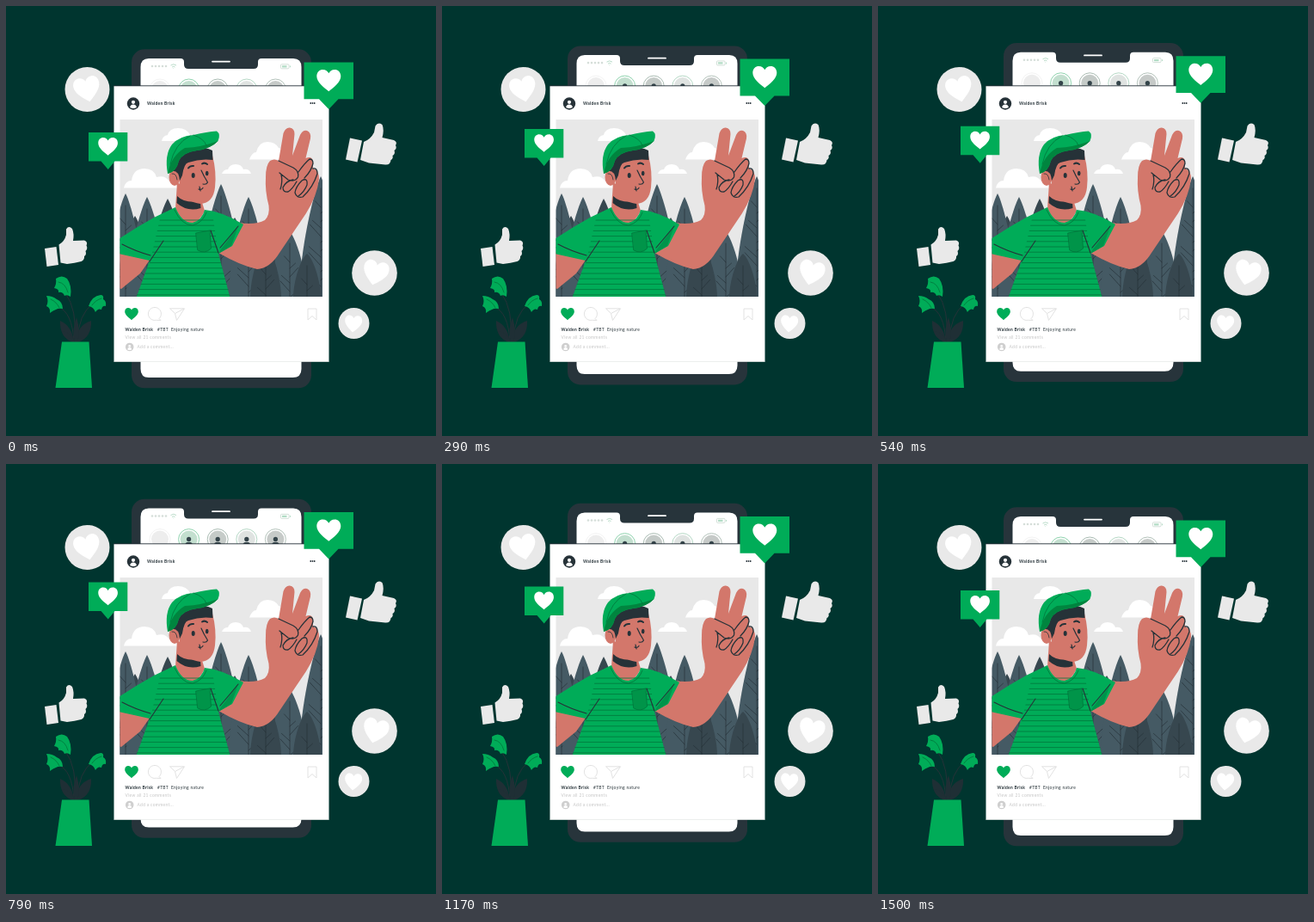
An HTML page that plays this animation: 500 px wide and 500 px high, repeating every 1.54 s.

```html
<!DOCTYPE html>
<html lang="en">
<head>
<meta charset="utf-8">
<title>Social post</title>
<style>
html, body { margin: 0; width: 100%; height: 100%; overflow: hidden; background: #00352f; }
svg { display: block; width: 100vw; height: 100vh; }
text { font-family: Lato, sans-serif; font-size: 4.9px; letter-spacing: .32px; fill: #263238; }
.b { font-weight: 700; }
.ln { fill: none; stroke: #263238; stroke-linecap: round; stroke-linejoin: round; }
.seam { fill: none; stroke: #00753c; stroke-width: .8; stroke-linecap: round; }
.icon { fill: none; stroke: #e2e2e2; stroke-width: 1; stroke-linejoin: round; }
</style>
</head>
<body>
<svg viewBox="0 0 500 500">
<defs>
  <path id="heart" d="M0 7C-3 4.6-8 1-8-3C-8-6-6-7.5-4-7.5C-2-7.5-.6-6.4 0-5C.6-6.4 2-7.5 4-7.5C6-7.5 8-6 8-3C8 1 3 4.6 0 7Z"/>
  <g id="user"><circle cy="-1.7" r="2.1"/><path d="M-3.8 4.4Q-3.6 .9 0 .9T3.8 4.4Q0 6.4-3.8 4.4Z"/></g>
  <clipPath id="photo"><rect x="132.500" y="132" width="235.500" height="206"/></clipPath>
  <clipPath id="torso"><path d="M180 243L240 241L247 288L261 338H151L168 295Z"/></clipPath>
</defs>
<rect width="500" height="500" fill="#00352f"/>

<!-- likes -->
<g fill="#e9e9e9">
  <circle cx="94.500" cy="97" r="26"/><circle cx="428.500" cy="310.500" r="26.300"/><circle cx="404.500" cy="369" r="18"/>
  <path d="M400 153.500L414 156.500L408.500 181.500L395 178.500Z"/>
  <path d="M416 158Q424 155 428 147L429.500 139.500Q432.500 134.500 437.500 138Q440 144 437.500 153L451 156Q455.500 158 453 162Q455 165.500 451.500 168Q453 172 449.500 174Q450.500 177.500 447.500 179Q447 185 441 184.500L422 182.500L412 179Z"/>
  <path d="M45 282L58.500 280L61 301L47.500 303Z"/>
  <path d="M61.500 277.500Q68 274 70 266L70 259.500Q73 255 77 259Q79.500 265 78 273L91 272.500Q95.500 274 93.500 278.500Q95.500 282 92.500 285Q94 289 91 291Q91.500 295 87.500 297Q80 299 71 300L63.500 298.500Z"/>
</g>
<g fill="#fff">
  <use href="#heart" transform="translate(94.500 97.500) rotate(-12) scale(1.9 2)"/>
  <use href="#heart" transform="translate(429.500 311) rotate(14) scale(1.85 1.95)"/>
  <use href="#heart" transform="translate(403.800 370) rotate(5) scale(1.25 1.35)"/>
</g>

<!-- plant -->
<g>
  <path class="ln" stroke-width="1" d="M80 390Q83 352 69 334M79 390Q77 356 61 350M83 390Q84 358 101 346"/>
  <g fill="#1f2f35">
    <path d="M79 391Q62 386 63 366Q77 372 79 391Z"/><path d="M77 391Q66 386 65 378Q76 379 80 391Z"/>
    <path d="M82 391Q82 371 99 366Q100 385 84 391Z"/><path d="M80 391Q76 376 82 362Q87 378 83 391Z"/>
  </g>
  <g fill="#00ac58">
    <path d="M58 317Q65 312 71 317Q77 325 75 338Q71 335 68 337Q66 332 61 333Q62 329 56 328Q59 323 58 317Z"/>
    <path d="M47 337Q54 337 59 341Q66 344 66 352Q61 351 58 353Q55 354 51 357Q52 351 47 349Q50 343 47 337Z"/>
    <path d="M96 349Q100 337 110 336Q114 336 113 341Q117 343 116 349Q112 348 111 353Q107 351 104 356Q102 350 96 349Z"/>
    <path d="M65 390.500H96.500L100 444H57.500Z"/>
  </g>
  <path class="seam" d="M61 321Q69 322 72 333M52 341Q59 344 62 351M111 340Q104 342 100 348"/>
</g>

<!-- phone -->
<g class="float">
  <rect x="146" y="50.300" width="209" height="394" rx="15" fill="#27343b"/>
  <path fill="#fff" d="M166 61H203Q207 61 207 65V68Q207 73 212 73H288Q293 73 293 68V65Q293 61 297 61H334Q343.500 61 343.500 71V422Q343.500 432 333.500 432H166Q156.500 432 156.500 422V71Q156.500 61 166 61Z"/>
  <path d="M240 64.600H260" stroke="#fff" stroke-width="1.800" stroke-linecap="round"/>
  <g id="dots" fill="#d5ded9"></g>
  <path d="M191.500 69Q194.800 66.500 198 69M193 71Q194.800 69.500 196.500 71M194.500 72.500H195" fill="none" stroke="#b9dcc9" stroke-width="1"/>
  <rect x="319.500" y="67.800" width="9.500" height="5" rx="1" fill="none" stroke="#c8d8cf" stroke-width=".8"/>
  <path d="M321 69.200H326.500V71.400H321ZM330 69.500H331V71.300H330Z" fill="#b2dcc5"/>
  <g id="stories"></g>
</g>

<!-- post -->
<rect x="125.500" y="93" width="250" height="320.500" fill="#fff"/>
<path d="M125 92.800H375.500" stroke="#263238" stroke-width=".9"/>
<path d="M125.500 413.500H375.500" stroke="#e4e8e6" stroke-width=".7"/>
<circle cx="148" cy="113.500" r="7.200" fill="#263238"/>
<use href="#user" x="148" y="113.500" fill="#fff"/>
<text class="b" x="164" y="115.200">Walden Brisk</text>
<g fill="#263238"><circle cx="354.300" cy="113" r=".9"/><circle cx="356.500" cy="113" r=".9"/><circle cx="358.700" cy="113" r=".9"/></g>

<g clip-path="url(#photo)">
  <rect x="132" y="132" width="237" height="207" fill="#e8e8e8"/>
  <g fill="#fff">
    <path d="M181 157Q182 151 188 150Q190 142 200 142Q210 142 214 150L216 157Z"/>
    <path d="M137 211.500Q139 203 146 203Q148 189 161 189Q172 189 175 199Q185 196 190 204Q198 205 199 211.500Z"/>
    <path d="M251 195Q253 190 258 190Q260 184 267 184Q274 184 276 190Q283 189 285 195Z"/>
    <path d="M283 178.500Q286 170 291 170Q294 158 304 158Q313 158 317 165Q327 167 331 178.500Z"/>
  </g>
  <g id="trees"></g>

  <!-- left arm, neck -->
  <path fill="#d3776b" d="M131 286L168 294L156 311L134 329L131 328Z"/>
  <path fill="#d3776b" d="M199 205L197 236Q203 253 214 254Q225 252 231 238L226 222Z"/>
  <path fill="#263238" d="M199 221Q208 230 226 227L226.500 235Q211 240 198.500 229Z"/>

  <!-- right arm and hand -->
  <path fill="#d3776b" d="M271 252Q290 255 301 249Q307 243 305.500 232Q301 215 302 199Q302 185 307 180Q312 177 317 180L322.500 148Q325 141 330 141.500Q335.500 142 335.500 149L333 174L342 150Q345 144 350 145Q355 147 354 154L348.500 177Q356 174 357 181L357 189Q364 191 364 201Q362 220 349 241L318 287Q307 305 292 306Q273 302 247 287Z"/>
  <path class="ln" stroke-width="1.300" d="M317 180L334 188Q341 192 339.500 199Q336 205 328 202L318 194M320 196Q322 204 319 213M334 202Q326 203 322 211Q322 217 328 216Q333 213 338 204M340 193Q347 183 353 178Q357 178 357 183Q355 192 347 200M357 189Q362 188 362 195Q357 211 345 222Q338 224 336 217Q337 210 344 203Q351 199 350 208Q347 216 340 221"/>

  <!-- shirt -->
  <path fill="#00ac58" d="M197 234Q204 252 217 252Q228 249 231 237Q252 239 276 254L263 279L247 288L260.500 339H151.500L167 296L131 288V271Q152 257 172 246Z"/>
  <g id="stripes" clip-path="url(#torso)"></g>
  <path fill="#009449" d="M221 264L237 261L238.500 282Q231 289 223 284Z"/>
  <path class="seam" d="M221 264L237 261L238.500 282Q231 289 223 284ZM196 237Q204 255 217 255Q229 252 233 240"/>
  <path fill="#00944b" d="M236 257L247 287L270 256L262 279L247 288Z"/>
  <path class="ln" stroke-width="1.100" d="M183 273L167 297M135 277Q150 285 168 290M238 261L247 287M270 256Q261 267 249 281"/>

  <!-- head -->
  <path fill="#d3776b" d="M201 178L240 174Q245 192 243 211Q241 229 226 230Q210 228 202 214Z"/>
  <ellipse cx="196" cy="199" rx="6.500" ry="10" fill="#d3776b"/>
  <path class="ln" stroke-width=".8" d="M193 195Q198 194 199 202"/>
  <path fill="#263238" d="M192 189L202 168Q224 160 240 168L240.500 179Q226 177 212 182Q207 183 205 197L202 203Q201 190 192 192Z"/>
  <g fill="#263238"><ellipse cx="217.700" cy="197" rx="2" ry="3"/><ellipse cx="233.700" cy="194.500" rx="1.800" ry="2.800"/></g>
  <path class="ln" stroke-width="2" d="M212 188.500Q214 185.500 218 186M228 183.500Q231 181.500 234 184"/>
  <path class="ln" stroke-width="1.200" d="M227 191Q230 198 234.500 205Q233 208 229 207M224 213Q227 214.500 229 211.500M225 210L226 215"/>
  <path fill="#00ac58" d="M188 195Q184 173 193 161Q202 151 218 150Q234 146 245 145.500Q250 149 246.500 157Q238 166 222 168Q206 170 201 180Q198 193 188 195Z"/>
  <path fill="#00853f" d="M246.500 157Q238 166 222 168Q206 170 201 180Q198 193 188 195Q192 174 208 165Q228 164 246.500 157Z"/>
  <path class="seam" d="M218 150Q230 154 233 162M214 151Q196 160 191 184"/>
</g>

<use href="#heart" transform="translate(146 358.300) scale(.98)" fill="#00ac58"/>
<path class="icon" d="M178 363.500A7.500 7.500 0 1 0 174.500 365.300L180 365.500ZM190.500 351.800H207.500L198.500 365.500L196.500 357.500ZM196.500 357.500L207 352M351 352H361V365L356 360.500L351 365Z"/>
<text class="b" x="138.500" y="378">Walden Brisk</text>
<text x="176" y="378">#TBT</text>
<text x="192" y="378">Enjoying nature</text>
<text x="138.500" y="386.700" style="fill:#c4c4c4">View all 21 comments</text>
<circle cx="143.700" cy="396.500" r="4.800" fill="#cfcfcf"/>
<use href="#user" transform="translate(143.700 396.500) scale(.66)" fill="#fff"/>
<text x="152.500" y="398.200" style="fill:#c4c4c4">Add a comment...</text>

<!-- badges -->
<g class="float">
  <path fill="#00ac58" d="M346.500 65.500H404V108.300H386.500L375.300 120L364 108.300H346.500Z"/>
  <use href="#heart" transform="translate(375.300 87) scale(1.75)" fill="#fff"/>
  <path fill="#00ac58" d="M96 147H141.300V180.500H126.500L118.700 190L110.500 180.500H96Z"/>
  <use href="#heart" transform="translate(118.600 163.700) scale(1.42)" fill="#fff"/>
</g>
</svg>
<script>
const $ = id => document.getElementById(id);
const fill = (id, list, draw) => { $(id).innerHTML = list.map(draw).join(''); };

function tree([x, top, w, color = '#455a64']) {
  const h = 340 - top;
  let twigs = `M${x} ${top + 14}V340`;
  for (let y = top + 36, i = 0; y < 336; y += 17, i++) {
    const s = Math.min(w * .55, (y - top) * .18), side = i % 2 ? 1 : -1;
    twigs += `M${x} ${y}l${side * s} ${-s * 1.1}M${x} ${y + 7}l${-side * s} ${-s * .9}`;
  }
  return `<path fill="${color}" d="M${x} ${top}C${x + 7} ${top + h * .1} ${x + w} ${top + h * .6} ${x + w} 340H${x - w}C${x - w} ${top + h * .6} ${x - 7} ${top + h * .1} ${x} ${top}Z"/>
    <path class="ln" stroke-width=".7" d="${twigs}"/>`;
}

const dark = '#37474f';
fill('trees', [
  [150, 244, 22, dark], [188, 224, 26, dark], [139, 218, 22], [164, 222, 24],
  [266, 246, 24, dark], [250, 207, 26], [312, 230, 24], [282, 222, 23],
  [366, 198, 25], [330, 262, 20], [302, 276, 18, dark], [350, 288, 16, dark]
], tree);
fill('stripes', [...Array(15).keys()], i => `<path class="seam" d="M150 ${249 + i * 6.2}H262"/>`);
fill('dots', [...Array(5).keys()], i => `<circle cx="${170 + i * 4}" cy="70" r="1.3"/>`);
fill('stories', [
  ['#ededed', '#f3f3f3', 0], ['#c3dfcf', '#8fd3ae', 1], ['#c5cbc8', '#a9bbb2', 1],
  ['#dfe3e1', '#b5d8c5', 1], ['#c6cac8', '#b3c2ba', 1]
], ([inner, ring, on], i) => `<g transform="translate(${179 + i * 33.6} 97)">
  <circle r="12" fill="#fff" stroke="${ring}"/><circle r="10" fill="${inner}"/>
  ${on ? '<use href="#user" fill="#34444a" transform="translate(0 2) scale(1.25)"/>' : ''}</g>`);

// Linear float, 10 px up and back in 1.5 s, stepped at 24 fps
const LOOP = 1540, RISE = 10, STEP = 1000 / 24;
const floats = document.querySelectorAll('.float');

function render(ms) {
  const t = Math.floor((ms % LOOP + 5) / STEP) * STEP;
  const up = Math.max(0, 1 - Math.abs(t / 750 - 1)) * RISE;
  floats.forEach(g => g.setAttribute('transform', `translate(0 ${-up.toFixed(2)})`));
}

const start = performance.now();
function tick() {
  render(performance.now() - start);
  requestAnimationFrame(tick);
}
tick();
</script>
</body>
</html>
```
